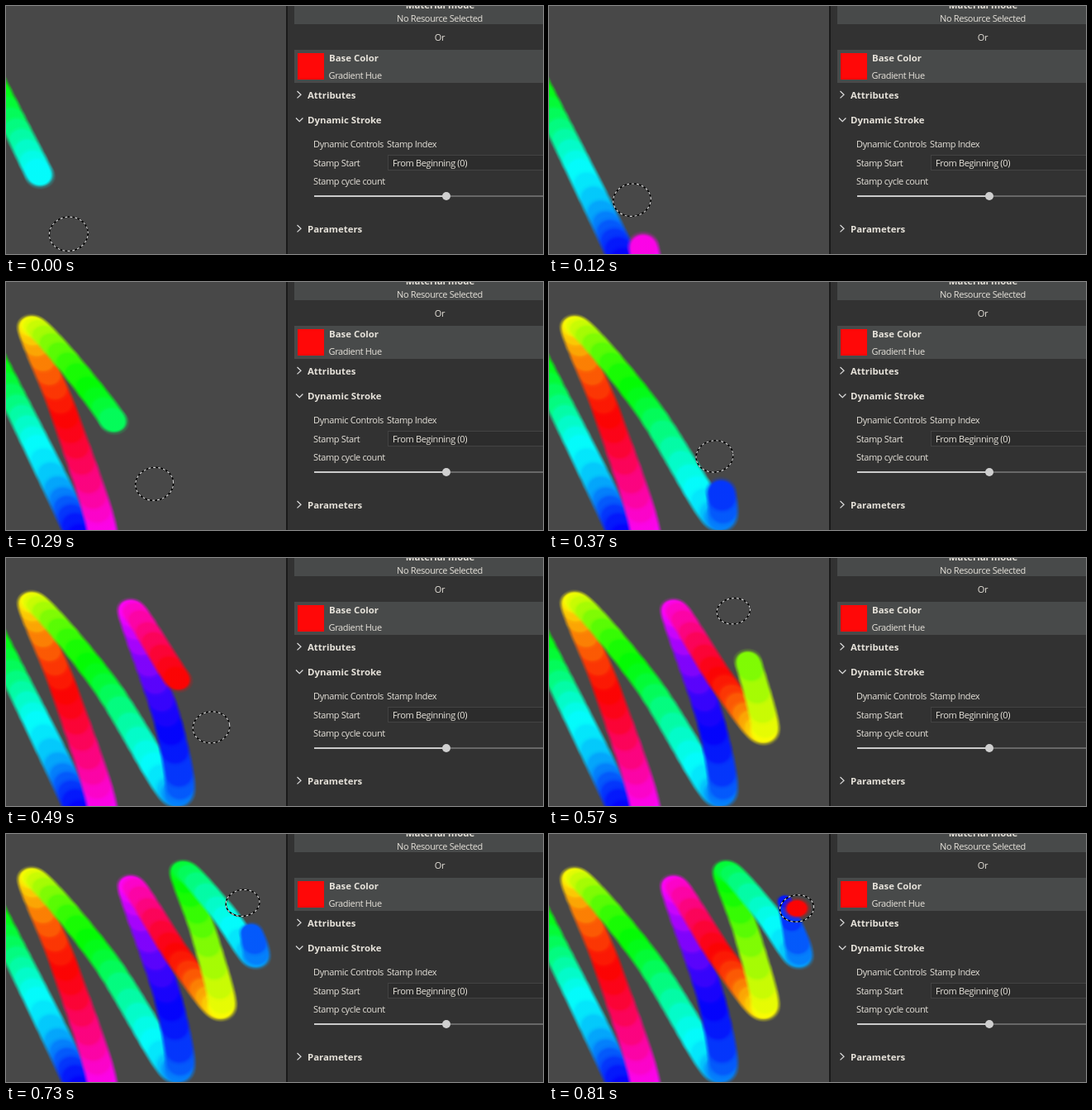
Animation of 650 by 300 pixels, one loop 0.93 s. Source, as an HTML page with a canvas:

```html
<!DOCTYPE html>
<html lang="en">
<head>
<meta charset="utf-8">
<title>Dynamic stroke</title>
<style>
  html, body { margin: 0; width: 100%; height: 100%; overflow: hidden; background: #484848; }
  canvas, svg { position: absolute; left: 0; top: 0; display: block; }
  text { font: 11px "Open Sans", "Noto Sans", sans-serif; letter-spacing: -.36px; fill: #e6e2da; }
  .b { font-weight: 700; font-size: 11.4px; letter-spacing: 0; }
  .m { text-anchor: middle; }
  .arrow { fill: none; stroke: #dcdcdc; stroke-width: 1.2; }
</style>
</head>
<body>
<canvas id="view" width="340" height="300"></canvas>
<svg width="650" height="300" viewBox="0 0 650 300">
  <rect x="339" width="311" height="300" fill="#323232"/>
  <rect x="339" width="2" height="300" fill="#191919"/>
  <rect x="349" y="-5" width="301" height="27" fill="#484a4a"/>
  <text class="b m" x="525.5" y="3">Material mode</text>
  <text class="m" x="525" y="19">No Resource Selected</text>
  <text class="m" x="525" y="42">Or</text>
  <rect x="349" y="53" width="301" height="40" fill="#484a4a"/>
  <rect x="353" y="57" width="32" height="32" fill="#ff0808"/>
  <text class="b" x="391" y="67">Base Color</text>
  <text x="390.5" y="88">Gradient Hue</text>
  <path class="arrow" d="M352.5 103l4.5 4.2-4.5 4.2M351 135.5l4.2 4.2 4.2-4.2M352.5 265l4.5 4.2-4.5 4.2"/>
  <text class="b" x="365" y="112">Attributes</text>
  <text class="b" x="365" y="142">Dynamic Stroke</text>
  <text x="372" y="171">Dynamic Controls</text>
  <text x="461" y="171">Stamp Index</text>
  <text x="372" y="194">Stamp Start</text>
  <rect x="462.5" y="180.5" width="200" height="18" fill="#2c2c2c" stroke="#434343"/>
  <text x="468" y="194">From Beginning (0)</text>
  <text x="372" y="216">Stamp cycle count</text>
  <rect x="373" y="229" width="277" height="2" fill="#686868"/>
  <rect x="373" y="229" width="160" height="2" fill="#cacaca"/>
  <circle cx="533" cy="230" r="5" fill="#cfcfcf"/>
  <text class="b" x="365" y="274">Parameters</text>
</svg>
<script>
const ctx = document.getElementById('view').getContext('2d');
const LOOP = 930, LAST = 20, LEAD = 8;

// The zigzag: x, y, hue; turning points also carry the time the stroke reaches them
const knots = [
  [-60, 2, 60, -83], [37, 197, 178], [85, 296, 231], [102, 338, 266, 65],
  [116, 300, 300], [70, 158, 360], [30, 51, 420, 241],
  [118, 151, 492], [205, 286, 564, 335],
  [197, 202, 600], [150, 61, 660, 447],
  [210, 150, 722], [261, 211, 779, 527],
  [240, 122, 812], [213, 43, 850, 611],
  [260, 92, 886], [303, 150, 926, 692],
  [285, 79, 952, 770]
];

const mix = (a, b, f) => a + (b - a) * f;
const ease = f => f * f * f * (10 + f * (6 * f - 15));

function spline(a, b, c, d, f) {
  return b + f * ((c - a) / 2 + f * (a - 2.5 * b + 2 * c - d / 2 + f * (1.5 * (b - c) + (d - a) / 2)));
}

// Sample the curve and measure it
const samples = [], turns = [];
let total = 0;
knots.forEach((b, i) => {
  const end = knots.length - 1;
  const a = knots[Math.max(0, i - 1)], c = knots[Math.min(end, i + 1)], d = knots[Math.min(end, i + 2)];
  for (let k = 0; k < (i < end ? 50 : 1); k++) {
    const f = k / 50, prev = samples[samples.length - 1];
    const x = spline(a[0], b[0], c[0], d[0], f), y = spline(a[1], b[1], c[1], d[1], f);
    if (prev) total += Math.hypot(x - prev.x, y - prev.y);
    samples.push({ x, y, hue: mix(b[2], c[2], f), s: total });
    if (!k && b.length > 3) turns.push({ s: total, t: b[3] });
  }
});

const pointAt = s => samples.find(p => p.s >= s) || samples[samples.length - 1];

// The hand slows at every turn
function lengthAt(t) {
  const i = turns.findIndex(p => p.t > t);
  if (i < 0) return total;
  const a = turns[i - 1], b = turns[i];
  return mix(a.s, b.s, ease((t - a.t) / (b.t - a.t)));
}

const stamps = [];
for (let s = 0; s <= total; s += 3) {
  stamps.push({ ...pointAt(s), size: Math.min(1, .6 + (total - s) / 150) });
}

const brush = y => [19.2 + y * .0155, 14 + y * .024];

// Stepped hue that lingers on the primary and secondary colours
function bandHue(h) {
  const q = Math.round(h / 7.5) * 7.5, base = Math.floor(q / 60) * 60, f = (q - base) / 60;
  return (base + 60 * mix(f, f * f * (3 - 2 * f), .5)) % 360;
}

function dab({ x, y, hue, size }) {
  const [rx, ry] = brush(y), r = rx * .88 * size;
  const tone = a => `hsla(${bandHue(hue)},97%,50%,${a})`;
  const g = ctx.createRadialGradient(0, 0, r * .6, 0, 0, r);
  g.addColorStop(0, tone(1));
  g.addColorStop(.5, tone(.25));
  g.addColorStop(1, tone(0));
  ctx.save();
  ctx.translate(x, y);
  ctx.scale(1, ry / rx);
  ctx.fillStyle = g;
  ctx.beginPath();
  ctx.arc(0, 0, r, 0, 7);
  ctx.fill();
  ctx.restore();
}

function cursor(x, y) {
  ctx.beginPath();
  ctx.ellipse(x, y, ...brush(y), -.15, 0, Math.PI * 2);
  ctx.lineWidth = 1.5;
  ctx.strokeStyle = '#000';
  ctx.stroke();
  ctx.setLineDash([3, 3]);
  ctx.lineWidth = 1.2;
  ctx.strokeStyle = '#d4d4d4';
  ctx.stroke();
  ctx.setLineDash([]);
}

function draw(step) {
  const t = step * 40 + (step > 4 ? 10 : 0), head = lengthAt(t);
  ctx.fillStyle = '#484848';
  ctx.fillRect(0, 0, 340, 300);
  stamps.filter(p => p.s <= head).forEach(dab);
  if (step === LAST) {
    // A new stroke begins again at red
    dab({ x: 300, y: 90, hue: 0, size: 1 });
    cursor(300, 90);
    return;
  }
  // The cursor runs ahead of the paint, further when it is fast
  const p = pointAt(head), q = pointAt(lengthAt(t - 2));
  cursor(p.x + (p.x - q.x) * LEAD, p.y + (p.y - q.y) * LEAD);
}

const stepAt = t => Math.min(LAST, Math.floor(t < 210 ? Math.min(t, 199) / 40 : (t - 10) / 40));

let shown = -1;
const start = performance.now();
function tick() {
  const step = stepAt((performance.now() - start) % LOOP);
  if (step !== shown) draw(shown = step);
  requestAnimationFrame(tick);
}
tick();
</script>
</body>
</html>
```
